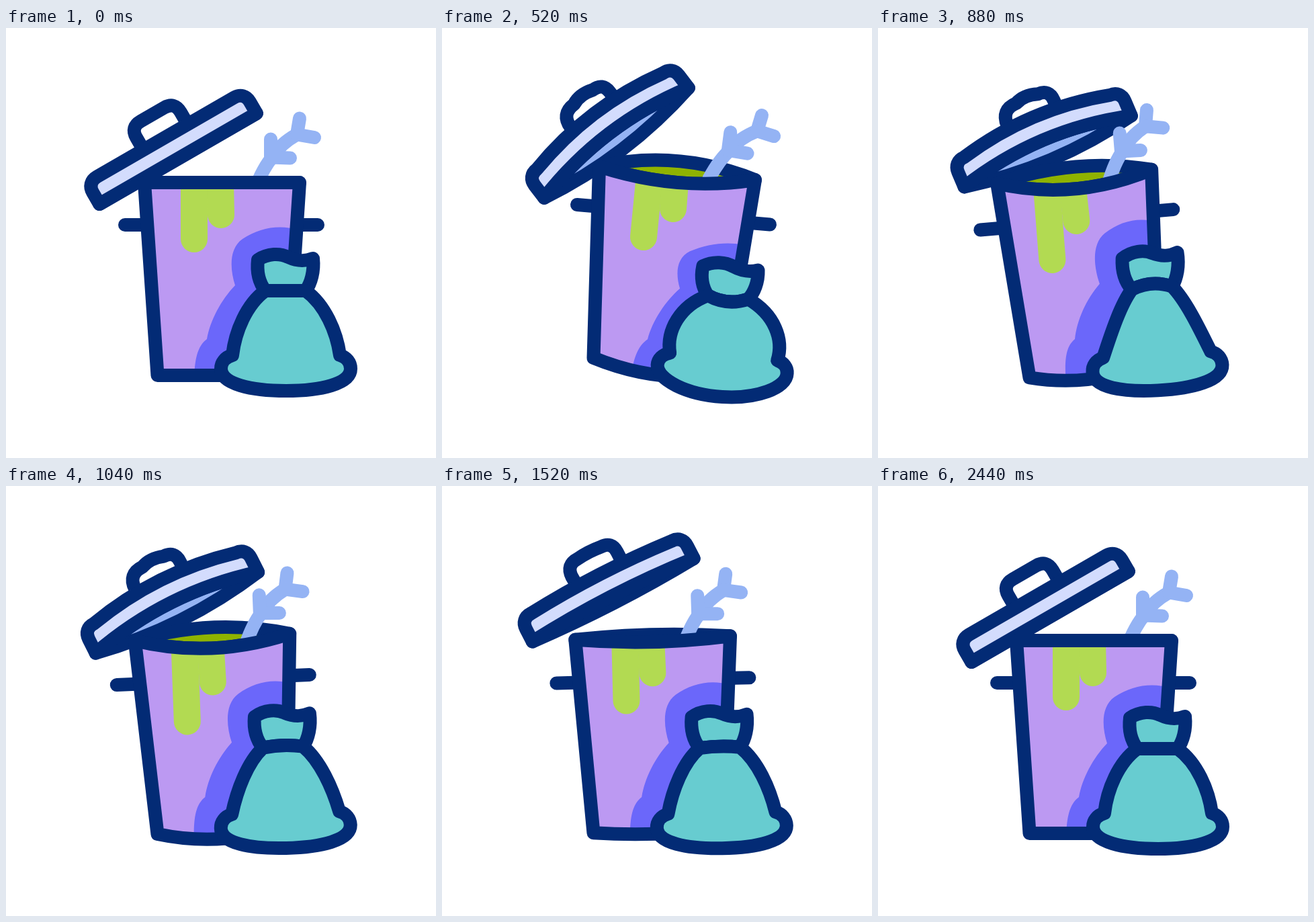
These frames come from a looping animation (640 by 640 pixels, 2.48 s). An HTML page with a canvas:

```html
<!DOCTYPE html>
<html lang="en">
<head>
<meta charset="utf-8">
<title>Trash can</title>
<style>
html, body { margin: 0; width: 100%; height: 100%; overflow: hidden; background: #fff; }
canvas { display: block; width: 100vmin; height: 100vmin; margin: 0 auto; }
</style>
</head>
<body>
<canvas id="stage" width="640" height="640"></canvas>
<script>
const ctx = document.getElementById('stage').getContext('2d');
const LOOP = 2480, STEP = 40;
const NAVY = '#032b75', PURPLE = '#bc99f2', BLUE = '#6b67fa', TEAL = '#67ccd0',
      PALE = '#d3dcfd', SKY = '#94b3f4', LIME = '#b2da52', MOSS = '#8fb300';

// Every part follows a few swings that start and end at rest and share these beats.
const beats = [80, 360, 520, 880, 1240, 1540, 1760, 2320];
const swings = {
  sway: [0.48, 1, -1.03, 0.42, -0.3, 0],      // bin lean
  bag: [0.82, 1, -0.85, 0.45, -0.28, 0],      // bag lean
  toss: [0.88, 1, -0.95, 0.37, -0.4, 0.05],   // lid and twig lean
  lift: [24, 14, 9, 1, 4, 0],                 // bin height
  hop: [45, 23.5, 11, 4.5, 25, 4],            // lid height
  pitch: [10, 16, 16.5, 13, 5, 0],            // rims opening to the viewer
  drip: [7, 11, 40, 35, 8, 0]                 // slime length
};

// Smooth curve through the beats; flat where a neighbour holds still.
function follow(inner, t) {
  const v = [0, ...inner, 0], last = beats.length - 1;
  if (t <= beats[0] || t >= beats[last]) return 0;
  let i = 0;
  while (t >= beats[i + 1]) i++;
  const span = beats[i + 1] - beats[i], u = (t - beats[i]) / span;
  const slope = k => k === 0 || k === last || v[k - 1] === v[k] || v[k] === v[k + 1]
    ? 0 : (v[k + 1] - v[k - 1]) / (beats[k + 1] - beats[k - 1]);
  const m = slope(i) * span, n = slope(i + 1) * span, rise = v[i + 1] - v[i];
  return v[i] + u * (m + u * (3 * rise - 2 * m - n + u * (m + n - 2 * rise)));
}

const same = (x, y) => [x, y];

// Builds a path: first entry moves, then 2 numbers = line, 4 = quadratic, 6 = cubic.
function trace(parts, warp = same) {
  ctx.beginPath();
  parts.forEach((part, i) => {
    const xy = [];
    for (let k = 0; k < part.length; k += 2) xy.push(...warp(part[k], part[k + 1]));
    if (i === 0) ctx.moveTo(...xy);
    else if (xy.length === 2) ctx.lineTo(...xy);
    else if (xy.length === 4) ctx.quadraticCurveTo(...xy);
    else ctx.bezierCurveTo(...xy);
  });
}

function outline(color = NAVY, width = 20) {
  ctx.strokeStyle = color;
  ctx.lineWidth = width;
  ctx.stroke();
}

function shape(parts, fill, warp) {
  trace(parts, warp);
  ctx.closePath();
  ctx.fillStyle = fill;
  ctx.fill();
  outline();
}

function line(parts, color, width) {
  trace(parts);
  outline(color, width);
}

function place(x, y, degrees, paint) {
  ctx.save();
  ctx.translate(x, y);
  ctx.rotate(degrees * Math.PI / 180);
  paint();
  ctx.restore();
}

function drawLid({ toss, hop, pitch }) {
  const up = 1.1 * pitch, down = 0.82 * pitch;
  const base = -37 - 0.9 * up, top = -76 - 0.45 * up, edge = -37 - 0.2 * up;
  const side = 38 + 0.12 * up, round = 18 + 0.4 * up;
  place(256 + 3.5 * toss, 194.5 - hop, -30 - 7.3 * toss, () => {
    line([[-38, base], [-side, top + round], [-side, top, round - side, top],
          [0, top - 0.4 * up, 20, top], [38, top, 38, top + 18], [38, base]]);
    shape([[-135, 0], [0, -2 * up, 135, 0], [0, 2 * down, -135, 0]], SKY);
    shape([[-135, 0], [-135, edge + 17], [-135, edge + 7, -129, edge, -118, edge],
           [0, -37 - 1.8 * up, 118, edge], [129, edge, 135, edge + 7, 135, edge + 17],
           [135, 0], [0, -2 * up, -135, 0]], PALE);
  });
}

function drawTwig({ toss, lift }) {
  const y = 134.5 + 5 * toss - 6 * toss * toss - 0.25 * lift;
  place(437 + 39 * toss, y, 6 * toss + 0.1 * lift, () => {
    line([[0, 0], [-4, 24], [-29, 38, -40, 57], [-54, 73, -66, 104]], SKY);
    line([[22, 28.5], [-4, 24]], SKY);
    line([[-43, 31], [-43, 58], [-14, 59]], SKY);
  });
}

function drawShadow({ bag }) {
  const dx = 18 * bag, dy = 18 * bag + 6 * bag * bag;
  trace([[460, 312], [425, 290, 385, 292, 352, 314], [332, 328, 333, 358, 341, 383],
         [320, 405, 304, 435, 299, 463], [286, 473, 280, 490, 280, 530], [460, 530]],
    (x, y) => {
      const w = Math.max(0, (507 - y) / 211);
      return [x + dx * w ** 0.6, y + dy * w ** 3];
    });
  ctx.fillStyle = BLUE;
  ctx.fill();
}

function drawBin(pose) {
  const { sway, lift, pitch, drip } = pose;
  const left = 206 + 28 * sway, right = 437 + 29 * sway, middle = (left + right) / 2;
  const rim = 230 - lift, floor = 517 - lift, tip = 10 * sway, slant = 0.085 * sway;
  const front = pitch - 2 * sway, back = pitch + 2 * sway;

  const handle = (x, y, reach) => line([[x, y], [x + reach, y + reach * slant]]);
  handle(left - 29 - 4 * sway, rim - tip + 63 - 6 * sway, 35);
  handle(right + 27 - 5 * sway, rim + tip + 63 + 3.5 * sway, -35);

  shape([[left, rim - tip], [middle, rim - 2 * back, right, rim + tip],
         [middle, rim + 2 * front, left, rim - tip]], MOSS);
  drawTwig(pose);

  const body = [[left, rim - tip], [middle, rim + 2 * front, right, rim + tip],
                [418, floor + 1.2 * tip],
                [321, floor + 1.7 * pitch, 225.5, floor - 1.2 * tip]];
  ctx.save();
  trace(body);
  ctx.closePath();
  ctx.fillStyle = PURPLE;
  ctx.fill();
  ctx.clip();
  drawShadow(pose);
  line([[left + 74, rim + front], [280 + 20 * sway, 314 - lift + drip]], LIME, 40);
  line([[left + 113, rim + front], [320 + 24 * sway, 278 - lift + 0.45 * drip]], LIME, 40);
  ctx.restore();

  trace(body);
  ctx.closePath();
  outline();
}

function drawBag({ bag }) {
  const dx = 14 * bag, dy = 10 * bag + 4 * bag * bag, tilt = 6 * bag;
  const warp = (x, y) => {
    const w = Math.max(0, (515 - y) / 178);
    return [x + dx * w, y + dy * w + tilt * (x - 416) / 95 * (1 + 0.6 * w)];
  };
  const neck = 391 + 2.4 * tilt, floor = 540 + 4.5 * (bag + bag * bag);
  const bulge = 12 * bag;
  shape([[386, 391], [376, 378, 373, 362, 375, 345], [390, 335, 408, 335, 420, 341],
         [435, 348, 446, 347, 457, 343], [459, 362, 454, 380, 446, 391],
         [416, neck, 386, 391]], TEAL, warp);
  shape([[386, 391], [358 - bulge, 411, 341 - bulge, 452, 337, 487],
         [326, 490, 320, 498, 320, 507],
         [320, 530, 365, floor, 417, floor], [468, floor, 513, 530, 513, 507],
         [513, 498, 507, 490, 497, 487],
         [492 + bulge, 452, 475 + bulge, 412, 446, 391],
         [416, neck, 386, 391]], TEAL, warp);
}

function draw(now) {
  const t = Math.floor(now % LOOP / STEP) * STEP;
  const pose = {};
  for (const name in swings) pose[name] = follow(swings[name], t);
  ctx.fillStyle = '#fff';
  ctx.fillRect(0, 0, 640, 640);
  drawLid(pose);
  drawBin(pose);
  drawBag(pose);
}

ctx.lineJoin = ctx.lineCap = 'round';
const start = performance.now();
function tick() {
  draw(performance.now() - start);
  requestAnimationFrame(tick);
}
tick();
</script>
</body>
</html>
```
